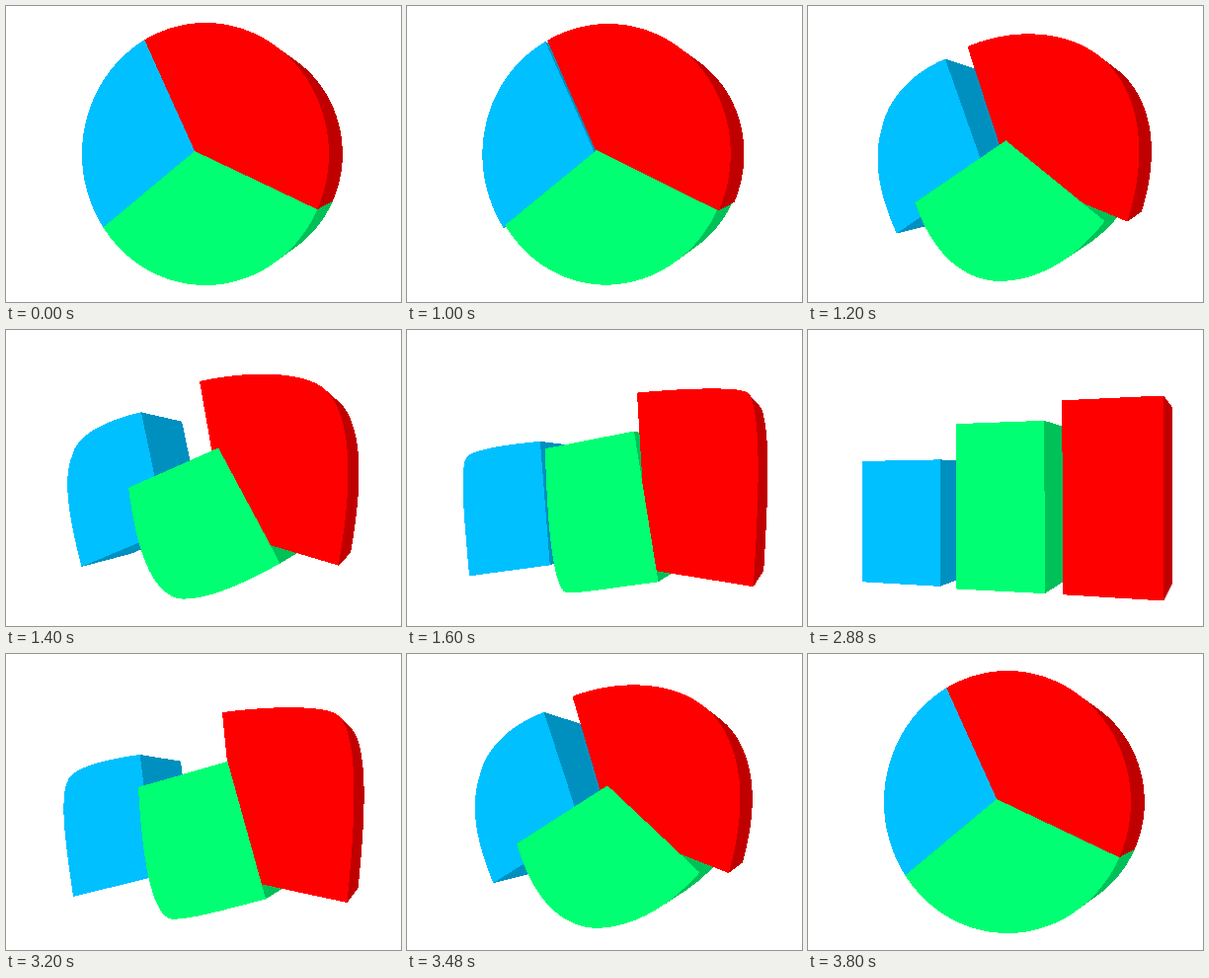
Write an HTML page that moves like this. It is 400 px wide and 300 px high and loops after 3.84 s.

```html
<!DOCTYPE html>
<html lang="en">
<head>
<meta charset="utf-8">
<title>Pie to bars</title>
<style>
  html, body { margin: 0; width: 100%; height: 100%; overflow: hidden; background: #fff; }
  svg { display: block; width: 100vw; height: 100vh; shape-rendering: crispEdges; }
</style>
</head>
<body>
<svg id="stage" viewBox="0 0 400 300"></svg>
<script>
const STEP = 40, STEPS = 96, MOVE = 24, SEGMENTS = 56;
const PIE = { cx: 202, cy: 150, rx: 125, ry: 133, hub: [191, 147] };
const VANISH = [423, 149], DEPTH = 0.144;

// bar: hub corner, start corner, outer corner, end corner (clockwise)
// bow: extra bulge of the two outer edges halfway; near: perspective weight
const blue = {
  front: '#00c0ff', side: '#0090c0', from: 146, to: 240.4, near: 1.01, bow: [4, 0],
  bar: [[133.6, 260.4], [54.6, 255.4], [54.6, 133.2], [133.6, 131.8]]
};
const green = {
  front: '#00ff72', side: '#00c058', from: 25, to: 146, near: 0.99, bow: [1.5, 3],
  bar: [[239.5, 91.6], [239.5, 267.4], [150, 262.4], [150, 94.6]]
};
const red = {
  front: '#ff0000', side: '#c00000', from: -119.6, to: 25, near: 0.9, bow: [-3.5, 4],
  bar: [[258, 268.8], [258, 71.5], [360.4, 66.6], [360.4, 274.8]]
};

const mix = (a, b, t) => [a[0] + (b[0] - a[0]) * t, a[1] + (b[1] - a[1]) * t];
const poly = pts => 'M' + pts.map(p => p[0].toFixed(2) + ' ' + p[1].toFixed(2)).join('L') + 'Z';
const recede = p => mix(p, VANISH, DEPTH);

function rim(deg) {
  const a = deg * Math.PI / 180;
  return [PIE.cx + PIE.rx * Math.cos(a), PIE.cy + PIE.ry * Math.sin(a)];
}

// Outer edges of a bar; points gather at the corner, so it stays round on the way
function barEdge(part, s) {
  const half = s < 0.5 ? 0 : 1;
  const a = part.bar[1 + half], b = part.bar[2 + half];
  const t = s * 2 - half;
  const len = Math.hypot(b[0] - a[0], b[1] - a[1]);
  return {
    point: mix(a, b, half ? t * t : 1 - (1 - t) ** 2),
    normal: [(b[1] - a[1]) / len, (a[0] - b[0]) / len],
    bow: part.bow[half] * Math.sin(Math.PI * t)
  };
}

function outline(part, q) {
  const f = q * part.near / (1 - q + q * part.near);
  const pts = [mix(PIE.hub, part.bar[0], f)];
  for (let i = 0; i <= SEGMENTS; i++) {
    const s = i / SEGMENTS;
    const { point, normal, bow } = barEdge(part, s);
    const p = mix(rim(part.from + (part.to - part.from) * s), point, f);
    const push = bow * 4 * q * (1 - q);
    pts.push([p[0] + normal[0] * push, p[1] + normal[1] * push]);
  }
  return pts;
}

// Only the walls that face the viewer
function walls(pts) {
  return pts.map((a, i) => {
    const b = pts[(i + 1) % pts.length];
    const turn = (b[0] - a[0]) * (VANISH[1] - a[1]) - (b[1] - a[1]) * (VANISH[0] - a[0]);
    return turn < 0 ? poly([a, b, recede(b), recede(a)]) : '';
  }).join('');
}

const stage = document.getElementById('stage');
function addPath(part, kind) {
  const el = document.createElementNS('http://www.w3.org/2000/svg', 'path');
  el.setAttribute('fill', part[kind]);
  stage.appendChild(el);
  return { el, part, kind };
}
const layers = [
  addPath(blue, 'side'), addPath(blue, 'front'),
  addPath(green, 'side'), addPath(red, 'side'),
  addPath(red, 'front'), addPath(green, 'front')
];

const ease = u => (1 - Math.cos(Math.PI * u)) / 2;

function progress(i) {
  if (i < 25) return 0;
  if (i < 47) return ease((i - 23) / MOVE);
  if (i < 72) return 1;
  return 1 - ease((i - 71) / MOVE);
}

function draw(i) {
  const q = progress(i);
  for (const { el, part, kind } of layers) {
    const pts = outline(part, q);
    el.setAttribute('d', kind === 'front' ? poly(pts) : walls(pts));
  }
}

let begin = null, last = 0;
function tick(now) {
  if (begin === null) begin = now;
  const i = Math.floor((now - begin) / STEP) % STEPS;
  if (i !== last) draw(last = i);
  requestAnimationFrame(tick);
}
draw(0);
requestAnimationFrame(tick);
</script>
</body>
</html>
```
